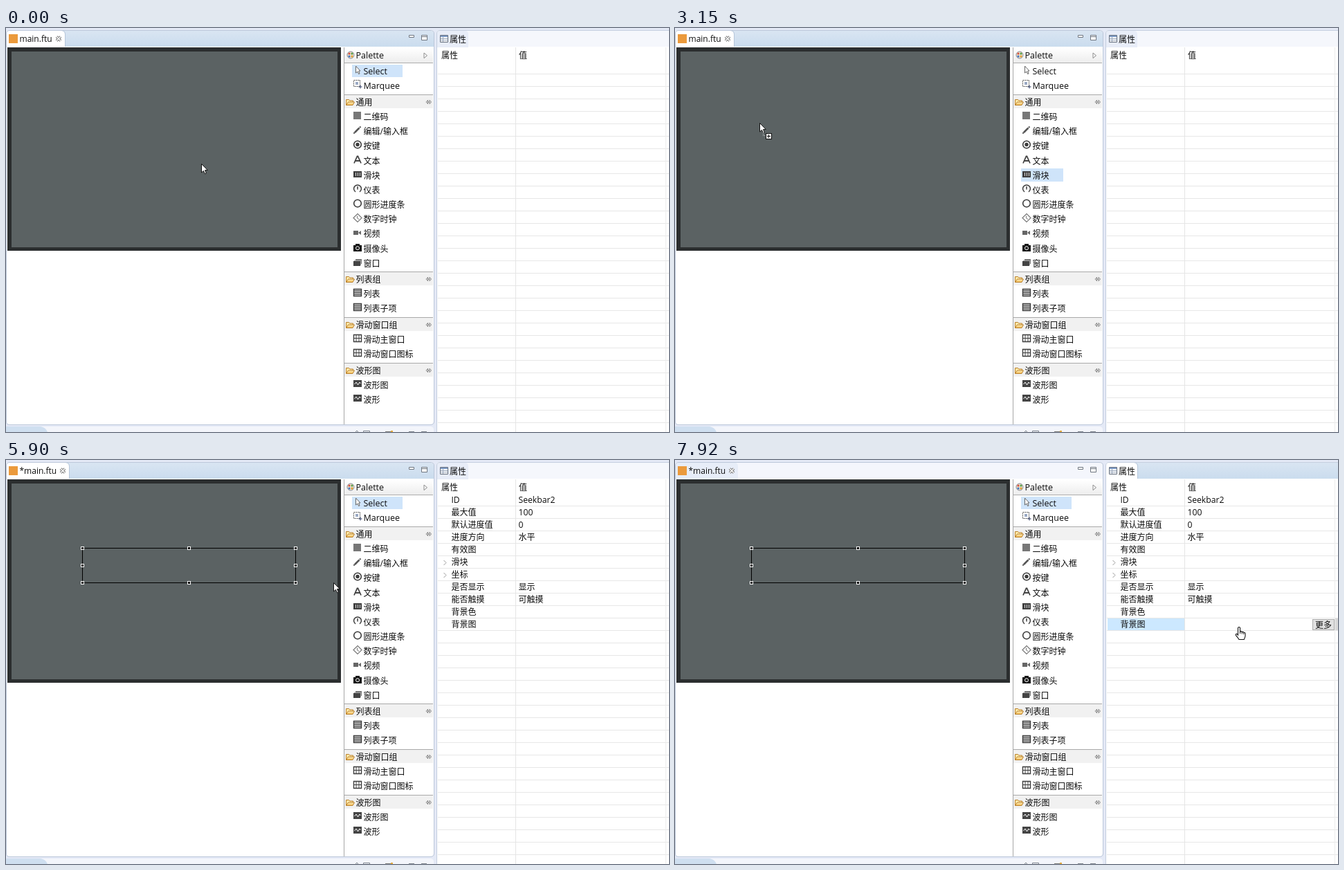
Recreate the animation shown at these times as an HTML page. Size 958x584 px, loop 7990 ms.

```html
<!DOCTYPE html>
<html lang="zh-CN">
<head>
<meta charset="utf-8">
<title>main.ftu</title>
<style>
html, body { margin: 0; width: 100%; height: 100%; overflow: hidden; background: #e4e9f6; }
svg { display: block; width: 958px; height: 584px; }
text { font-family: "Open Sans", "Noto Sans CJK SC", "Noto Sans CJK", sans-serif; fill: #0c0c0c; white-space: pre; }
rect, .crisp { shape-rendering: crispEdges; }
.off { display: none; }
</style>
</head>
<body>
<svg id="stage" viewBox="0 0 958 584">
  <defs>
    <linearGradient id="bar" x2="0" y2="1"><stop offset="0" stop-color="#d9e5f2"/><stop offset="1" stop-color="#cadcee"/></linearGradient>
    <linearGradient id="head" x2="0" y2="1"><stop offset="0" stop-color="#fff"/><stop offset="1" stop-color="#ededed"/></linearGradient>
    <linearGradient id="fold" x2="0" y2="1"><stop offset="0" stop-color="#fff3c4"/><stop offset="1" stop-color="#f2b94e"/></linearGradient>
  </defs>
</svg>
<script>
const stage = document.getElementById('stage');
const LOOP = 7990;

function add(tag, attrs, parent = stage) {
  const el = document.createElementNS('http://www.w3.org/2000/svg', tag);
  for (const k in attrs) el.setAttribute(k, attrs[k]);
  parent.appendChild(el);
  return el;
}
const group = () => add('g', {});
const box = (x, y, width, height, fill, p, more) => add('rect', { x, y, width, height, fill, ...more }, p);
const line = (d, stroke, p, w = 1, fill = 'none') => add('path', { d, stroke, fill, 'stroke-width': w }, p);
const shape = (d, fill, p) => add('path', { d, fill }, p);
function label(x, mid, s, size = 12, p) {
  add('text', { x, y: mid + 4.5, 'font-size': size }, p).textContent = s;
}
const show = (el, on) => el.classList.toggle('off', !on);
const place = (el, x, y) => el.setAttribute('transform', `translate(${x} ${y})`);

// Left pane
shape('M0 573V7Q0 3 5 3H613Q618 3 618 8V569Q618 573 613 573H5Q0 573 0 569Z', '#fff');
const leftTop = 'M1 27V8Q1 4 5 4H613Q618 4 618 8V27Z';
const leftIdle = shape(leftTop, '#f4f6fc');
const leftBusy = shape(leftTop, 'url(#bar)');
function tabShape(end) {
  const g = group();
  shape(`M1 28V8Q1 4 5 4H${end - 5}Q${end} 4 ${end} 9V28Z`, '#fff', g);
  line(`M${end - 5} 3.5Q${end + .5} 4 ${end + .5} 9V27`, '#b6c6da', g);
  return g;
}
const tabClean = tabShape(85), tabDirty = tabShape(91);
const tabIdle = shape('M1 28V8Q1 4 5 4H86Q91 4 91 9V28Z', '#e7edf8');
line('M.5 570V8Q.5 3.5 5 3.5H613Q618.5 3.5 618.5 8V569Q618.5 573.5 613 573.5H5Q.5 573.5 .5 569Z', '#bcc8da');
box(4, 9, 13, 13, '#eb9a3c');
function title(s, x) {
  const g = group();
  label(19.5, 15.5, s, 12, g);
  const cross = `M${x - 3} 12.5L${x + 3} 18.5M${x + 3} 12.5L${x - 3} 18.5`;
  line(cross, '#777', g, 3.6);
  line(cross, '#fff', g, 1.6);
  return g;
}
const titleClean = title('main.ftu', 76), titleDirty = title('*main.ftu', 82);
line('M582.5 10.5H589.5V13.5H582.5Z', '#6f7680', stage, 1, '#fff');
line('M600.5 10.5H608.5V17.5H600.5ZM600.5 12.5H608.5', '#6f7680', stage, 1, '#fff');

// Design canvas
box(2, 28, 482, 294, '#2b2e2f');
box(8, 34, 471, 283, '#5b6263');

// Palette
box(488, 28, 1, 545, '#a6a6a6');
box(489, 29, 128, 21, 'url(#head)');
box(489, 50, 128, 1, '#adadad');
add('circle', { cx: 498, cy: 39, r: 5, fill: '#eadfc8', stroke: '#8a8f9a' });
[[496, 37, '#d64b3c'], [500, 37, '#4e9b45'], [496, 41, '#3d72c4'], [500, 41, '#e09a2e']]
  .forEach(([cx, cy, fill]) => add('circle', { cx, cy, r: 1.5, fill }));
line('M604 36L608.5 39.8L604 43.6Z', '#8a8a8a', stage, 1, '#fff');
label(505.5, 39.5, 'Palette', 12.5);
const pickSelect = box(500, 53, 73, 18, '#cfe4fa');
const hoverSlider = box(500, 203, 61, 19, '#e7f2fd');
const pickSlider = box(500, 203, 61, 19, '#cfe4fa');

const ink = '#3c3c3c';
const list = y => {
  line(`M502.5 ${y - 6.5}H513.5V${y + 3.5}H502.5Z`, ink, stage, 1.4, '#ddd');
  [-4, -1.5, 1].forEach(d => line(`M503 ${y + d}H513`, ink, stage, 1.2));
};
const panes = y => {
  line(`M502.5 ${y - 6.5}H513.5V${y + 3.5}H502.5Z`, ink, stage, 1.4, '#fff');
  line(`M506 ${y - 6}V${y + 3}M510 ${y - 6}V${y + 3}M503 ${y - 1.5}H513`, ink);
};
const wave = y => {
  box(502, y - 7, 12, 10, '#444', stage, { rx: 1 });
  line(`M503.5 ${y - 1}L506 ${y - 4}L508.5 ${y}L511 ${y - 4}L512.5 ${y - 2}`, '#fff');
};
const ring = (y, w) => add('circle', { cx: 508, cy: y - 1.5, r: 5.3, fill: 'none', stroke: ink, 'stroke-width': w });
const icons = {
  Select: y => line(`M505.5 ${y - 7}V${y + 3}L508 ${y + 1}L509.5 ${y + 4.5}L511 ${y + 4}L509.7 ${y}H512Z`, '#666', stage, 1, '#fff'),
  Marquee: y => {
    line(`M502.5 ${y - 7.5}H511.5V${y + 1.5}H502.5Z`, '#555').setAttribute('stroke-dasharray', '2 1');
    box(505, y - 5, 4, 4, '#9aa9c4');
    line(`M512 ${y - .5}V${y + 4.5}M509.5 ${y + 2}H514.5`, '#2f3c66');
  },
  '二维码': y => box(502, y - 7, 11, 11, '#777'),
  '编辑/输入框': y => {
    line(`M504 ${y + 2}L510.5 ${y - 4.5}`, '#555', stage, 2.6);
    line(`M511 ${y - 5}L512.5 ${y - 6.5}M502.3 ${y + 3.5}L504 ${y + 2}`, '#555', stage, 2);
  },
  '按键': y => {
    ring(y, 1.6);
    add('circle', { cx: 508, cy: y - 1.5, r: 2.7, fill: ink });
  },
  '文本': y => line(`M503 ${y + 3.5}L507.5 ${y - 6.5}H508.5L513 ${y + 3.5}M505 ${y}H511`, '#444', stage, 1.8),
  '滑块': y => {
    box(502, y - 6, 12, 9, '#404040', stage, { rx: 1 });
    line(`M505.5 ${y - 4}V${y + 1}M508.5 ${y - 4}V${y + 1}M511.5 ${y - 4}V${y + 1}`, '#ddd');
  },
  '仪表': y => line(`M505 ${y + 2.8}A5.4 5.4 0 1 1 511 ${y + 2.8}M508 ${y - 5}V${y - .5}`, ink, stage, 1.5),
  '圆形进度条': y => ring(y, 1.6),
  '数字时钟': y => {
    line(`M508 ${y - 7.5}L514 ${y - 1.5}L508 ${y + 4.5}L502 ${y - 1.5}Z`, '#777', stage, 1.2);
    line(`M507.5 ${y - 4.5}V${y - 1}L510 ${y + .5}`, '#777');
  },
  '视频': y => {
    box(502, y - 4, 7, 6, '#666');
    shape(`M509 ${y - 1}L513 ${y - 4}V${y + 2}Z`, '#666');
  },
  '摄像头': y => {
    box(502, y - 5, 12, 9, '#111', stage, { rx: 1 });
    box(505, y - 7, 6, 3, '#111');
    add('circle', { cx: 508, cy: y - .8, r: 2.5, fill: '#111', stroke: '#fff' });
  },
  '窗口': y => {
    box(505, y - 6, 9, 7, '#777');
    box(503, y - 4, 10, 7, '#aaa');
    box(502, y - 3, 10, 7, '#444');
  },
  '列表': list, '列表子项': list, '滑动主窗口': panes, '滑动窗口图标': panes, '波形图': wave, '波形': wave
};
function item(name, y) {
  icons[name](y);
  label(516.5, y, name, /^[A-Z]/.test(name) ? 12.5 : 12);
}
function section(name, y, items) {
  box(489, y - 11, 128, 1, '#a9a9a9');
  box(489, y - 10, 128, 19, '#f1f1f1');
  line(`M491.5 ${y + 4.5}V${y - 3.5}H495.5L497 ${y - 2}H501.5V${y}`, '#b9802c', stage, 1, '#ffe9a8');
  line(`M491.5 ${y + 4.5}L494.5 ${y}H503.5L501 ${y + 4.5}Z`, '#b9802c', stage, 1, 'url(#fold)');
  line(`M607 ${y}L609.5 ${y - 2.7}V${y + 2.7}ZM614.5 ${y}L612 ${y - 2.7}V${y + 2.7}ZM609.5 ${y}H612`, '#777', stage, .9, '#fff');
  label(505.5, y, name);
  items.forEach((s, i) => item(s, Math.round(y + 21 + i * 21.18)));
}
item('Select', 62);
item('Marquee', 83);
section('通用', 107, ['二维码', '编辑/输入框', '按键', '文本', '滑块', '仪表', '圆形进度条', '数字时钟', '视频', '摄像头', '窗口']);
section('列表组', 363, ['列表', '列表子项']);
section('滑动窗口组', 429, ['滑动主窗口', '滑动窗口图标']);
section('波形图', 495, ['波形图', '波形']);

// Bottom strip
shape('M0 584V576H613Q618 576 618 581V584Z', '#f3f5fb');
shape('M0 584V576H50Q57 577 60 584Z', '#cfdff0');
line('M505 584L507 582L509 584M516.5 584V582.5H525.5V584M582 583.5H590M600 583.5H608', '#7b828c');
line('M548 583.5H556', '#777');
box(556, 582, 3, 2, '#e0a63c');

// Property pane
const rightTop = 'M623 27V8Q623 4 627 4H958V27Z';
shape('M622 584V8Q622 3 627 3H958V584Z', '#fff');
const rightIdle = group(), rightBusy = group();
const rightTab = 'M623 28V8Q623 4 627 4H663Q668 4 668 9V28Z';
shape(rightTop, '#f5f7fc', rightIdle);
shape(rightTab, '#e8edf8', rightIdle);
shape(rightTop, 'url(#bar)', rightBusy);
shape(rightTab, '#fff', rightBusy);
line('M663 3.5Q668.5 4 668.5 9V27', '#b6c6da', rightBusy);
line('M622.5 584V8Q622.5 3.5 627 3.5H958', '#c5cfdf');
line('M627.5 10.5H638.5V20.5H627.5Z', '#68717f', stage, 1, '#fff');
box(628, 11, 10, 2, '#7f9cc6');
line('M631.5 13V20M628 15.5H638M628 18H638', '#9aa8bc');
label(641, 16, '属性');
label(629, 39.5, '属性');
label(741, 39.5, '值');

const hoverRow = box(625, 0, 333, 18, '#e5f3ff');
const firstRow = box(625, 49, 333, 17, '#cce8ff');
const pickRow = box(625, 229, 111, 17, '#cce8ff');
const grid = group();
for (let y = 66; y < 584; y += 18) box(624, y, 334, 1, '#e7e7e7', grid);
box(736, 28, 1, 556, '#e4e4e4', grid);
box(953, 28, 1, 556, '#ececec', grid);
const blank = box(624, 84, 334, 500, '#fff');

const props = group();
[['ID', 'Seekbar2'], ['最大值', '100'], ['默认进度值', '0'], ['进度方向', '水平'], ['有效图'], ['滑块'], ['坐标'],
 ['是否显示', '显示'], ['能否触摸', '可触摸'], ['背景色'], ['背景图']].forEach(([key, value], i) => {
  const y = 57.5 + i * 18;
  label(643.5, y, key, 12, props);
  if (value) label(740.5, y, value, /\w/.test(value) ? 12.2 : 12, props);
  if (i === 5 || i === 6) line(`M632.5 ${y - 2.5}L636 ${y + 1}L632.5 ${y + 4.5}`, '#9a9a9a', props);
});
const editor = group();
box(921, 230, 32, 16, '#adadad', editor);
box(922, 231, 30, 14, '#e1e1e1', editor);
box(954, 229, 4, 17, '#d9d9d9', editor);
label(925, 238, '更多', 12, editor);
const caret = box(738, 229, 1, 16, '#000');

// Drag rectangle and selected widget
const rubber = box(0, 0, 0, 0, '#467b7a', stage, { stroke: '#a99a9a', 'stroke-dasharray': '2 1' });
const widget = group();
line('M110.5 127.5H418.5V177.5H110.5Z', '#000', widget).setAttribute('class', 'crisp');
for (const x of [110, 264, 418]) for (const y of [127, 152, 177]) {
  if (x === 264 && y === 152) continue;
  box(x - 2, y - 2, 5, 5, '#fff', widget);
  box(x - 1, y - 1, 3, 3, '#000', widget);
}

// Pointers, each with its hot spot at 0,0
const arrow = group(), plus = group(), resize = group(), hand = group();
line('M.5 .5V13L3.4 10.4L5.4 14.8L7.4 14L5.5 9.6H9.3Z', '#111', arrow, 1, '#fff');
line('M5 18.5H9M5.5 14V18', '#c8cccc', plus).setAttribute('stroke-dasharray', '1 1');
box(9, 15, 9, 9, '#111', plus);
box(10, 16, 7, 7, '#fff', plus);
box(11, 19, 5, 1, '#111', plus);
box(13, 17, 1, 5, '#111', plus);
line('M-6.5 -6.5H-1.5L-3.2 -4.7L4.7 3.2L6.5 1.5V6.5H1.5L3.2 4.7L-4.7 -3.2L-6.5 -1.5Z', '#111', resize, 1, '#fff');
line('M-.5 12V1.5Q1 -.5 2.5 1.5V7Q4 6 5.2 7.6Q6.8 6.8 7.8 8.3Q10 8 10 10V13.5Q9.5 16 8.2 18.5H1Q-.5 16 -3.6 12.4Q-4 10 -2 10.4Z', '#111', hand, 1.1, '#fff');
line('M2.5 7V10M5.2 8V10.5M7.8 8.5V11', '#111', hand);
place(resize, 419, 178);
place(hand, 814, 241);

// Pointer path: time, x, y
const path = [
  [0, 282, 196], [485, 282, 196], [675, 318, 199], [930, 445, 208], [1180, 516, 213],
  [1925, 516, 213], [2130, 491, 215], [2400, 372, 206], [2600, 285, 186], [2770, 251, 179],
  [2900, 236, 172], [3010, 178, 152], [3150, 122, 137], [3330, 115, 132], [3580, 111, 128],
  [3720, 140, 136], [3900, 240, 168], [4080, 350, 194], [4200, 400, 190], [4350, 419, 178],
  [5520, 419, 178], [5700, 430, 176], [5900, 473, 177], [6050, 560, 182], [6200, 662, 193],
  [6350, 745, 208], [6420, 759, 214], [6550, 795, 231], [6680, 814, 241], [LOOP, 814, 241]
];
// The pointer moves in steps of about 66 ms.
function pointer(t) {
  const i = path.findIndex(p => p[0] > t);
  const [t0, x0, y0] = path[i - 1], [t1, x1, y1] = path[i];
  const n = Math.max(1, Math.round((t1 - t0) / 66));
  const u = Math.floor((t - t0) / (t1 - t0) * n + 1e-6) / n;
  return [Math.round(x0 + (x1 - x0) * u), Math.round(y0 + (y1 - y0) * u)];
}

function draw(t) {
  const within = (a, b) => t >= a && t < b;
  const [x, y] = pointer(t);
  const made = t >= 5220, right = t >= 7040, edit = t >= 7420;

  show(leftBusy, !right);
  show(leftIdle, right);
  show(tabClean, !made);
  show(tabDirty, made && !right);
  show(tabIdle, right);
  show(titleClean, !made);
  show(titleDirty, made);
  show(rightIdle, !right);
  show(rightBusy, right);

  const armed = within(1720, 5220);
  show(pickSelect, !armed);
  show(pickSlider, armed);
  show(hoverSlider, t < 1720 && x >= 500);

  show(props, made);
  show(widget, made);
  show(blank, within(4960, 5220));
  show(hoverRow, made && x >= 625 && !edit);
  hoverRow.setAttribute('y', 49 + 18 * Math.floor((y - 49) / 18));
  show(firstRow, within(7110, 7420));
  show(pickRow, edit);
  show(editor, edit);
  show(caret, within(7420, 7920));

  show(rubber, within(3650, 4840));
  const size = { x: 111.5, y: 128.5, width: Math.max(0, x - 111), height: Math.max(0, y - 128) };
  for (const k in size) rubber.setAttribute(k, size[k]);

  const sizing = within(5220, 5585);
  show(arrow, !sizing && !edit);
  show(plus, armed && x < 488);
  show(resize, sizing);
  show(hand, edit);
  place(arrow, x, y);
  place(plus, x, y);
}

function tick() {
  draw(performance.now() % LOOP);
  requestAnimationFrame(tick);
}
tick();
</script>
</body>
</html>
```
